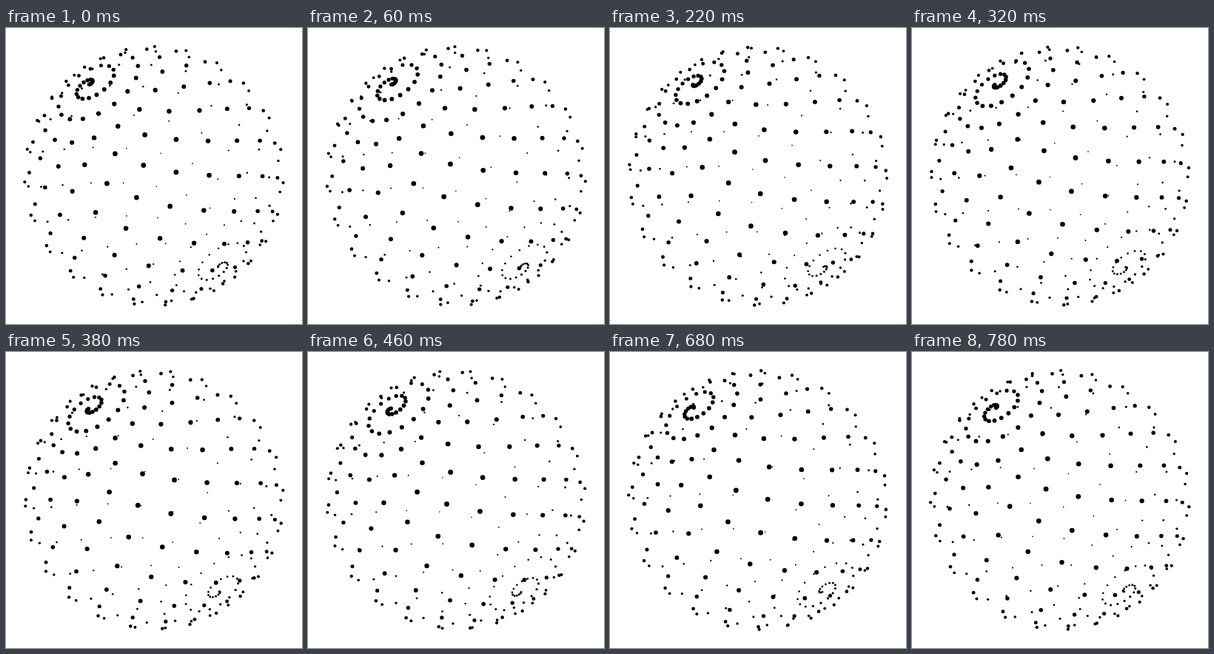
An HTML page for the animation above (800 ms loop, 400 by 400 pixels).

```html
<!DOCTYPE html>
<html lang="en">
<head>
<meta charset="utf-8">
<title>Spiral sphere</title>
<style>
  html, body { margin: 0; width: 100%; height: 100%; overflow: hidden; background: #fff; }
  svg { display: block; width: 100%; height: 100%; }
</style>
</head>
<body>
<svg viewBox="0 0 400 400"><g id="dots" fill="#000"></g></svg>
<script>
const ARMS = 16, COUNT = ARMS * ARMS;
const RADIUS = 175, CENTER = 200;
const LOOP = 800, TICK = 20;
const TAU = 2 * Math.PI, DIAG = Math.SQRT1_2;

const group = document.getElementById('dots');
const dots = Array.from({ length: COUNT }, () =>
  group.appendChild(document.createElementNS('http://www.w3.org/2000/svg', 'circle')));

// Point on the unit sphere, turned 45 degrees about x and then about y.
// Screen axes: x right, y down, z toward the viewer.
function project(lat, lon) {
  const a = Math.sin(lat) * Math.cos(lon);
  const b = Math.sin(lat) * Math.sin(lon);
  const c = Math.cos(lat);
  const depth = (c - b) * DIAG;
  return {
    x: (a - depth) * DIAG,
    y: -(b + c) * DIAG,
    z: (a + depth) * DIAG
  };
}

function render(ms) {
  const t = Math.floor((ms % LOOP) / TICK) * TICK / LOOP;
  const flow = ARMS * t;
  dots.forEach((dot, i) => {
    const place = i + flow % 1;
    const lat = Math.PI * place / COUNT;
    const lon = lat + TAU * (place - flow + t) / ARMS;
    const { x, y, z } = project(lat, lon);
    dot.setAttribute('cx', (CENTER + RADIUS * x).toFixed(2));
    dot.setAttribute('cy', (CENTER + RADIUS * y).toFixed(2));
    dot.setAttribute('r', (2.1 + 1.3 * z).toFixed(2));
  });
}

const begin = performance.now();
function loop() {
  render(performance.now() - begin);
  requestAnimationFrame(loop);
}
loop();
</script>
</body>
</html>
```
